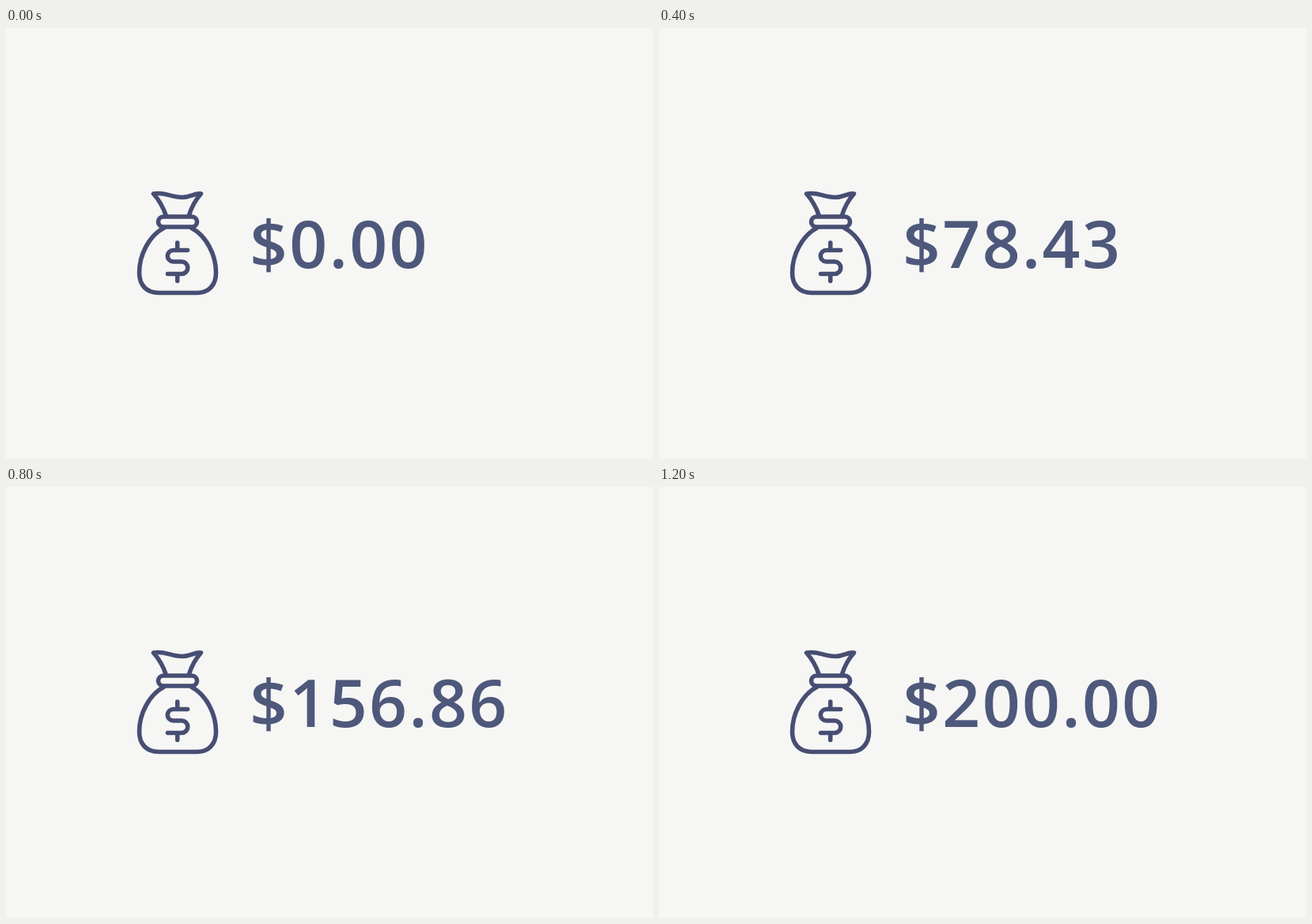
Write an HTML page that moves like this. It is 818 px wide and 546 px high and loops after 2740 ms.

```html
<!DOCTYPE html>
<html lang="en">
<head>
<meta charset="utf-8">
<title>Money counter</title>
<style>
  html, body { margin: 0; width: 100%; height: 100%; overflow: hidden; background: #f6f6f4; }
  svg { display: block; width: 100%; height: 100%; }
  .bag { fill: none; stroke: #474e73; stroke-width: 5.6; stroke-linecap: round; stroke-linejoin: round; }
  #amount { font: 600 84px "Open Sans", "Noto Sans", sans-serif; letter-spacing: 2.4px; fill: #4e587b; }
</style>
</head>
<body>
<svg viewBox="0 0 818 546">
  <g class="bag">
    <path d="M202 237 Q197 222 186.500 210 C201 207 207 214.500 223 214.500 C234 214.500 238 209 246.500 210 Q236 222 231.500 237"/>
    <rect x="192.500" y="239" width="49" height="13" rx="6.500"/>
    <path d="M200 253 C181 263 168.500 287 168.500 310 C168.500 326 178 335.500 193 335.500 H241 C256 335.500 265.500 326 265.500 310 C265.500 287 253 263 234 253"/>
    <path d="M229.500 281.500 H211.500 a7.250 7.250 0 0 0 0 14.500 H222 a7.750 7.750 0 0 1 0 15.500 H204.500 M216.700 272 V281 M216.700 312 V320.500"/>
  </g>
  <text id="amount" x="308" y="304">$0.00</text>
</svg>
<script>
  const LOOP = 2740, STEP = 20, STEPS = 51, TOTAL = 200;
  const amount = document.getElementById("amount");
  const start = performance.now();

  function draw(now) {
    const time = Math.max(0, now - start) % LOOP;
    const step = Math.min(STEPS, Math.floor(time / STEP));
    amount.textContent = "$" + (TOTAL * step / STEPS).toFixed(2);
    requestAnimationFrame(draw);
  }
  draw(start);
</script>
</body>
</html>
```
